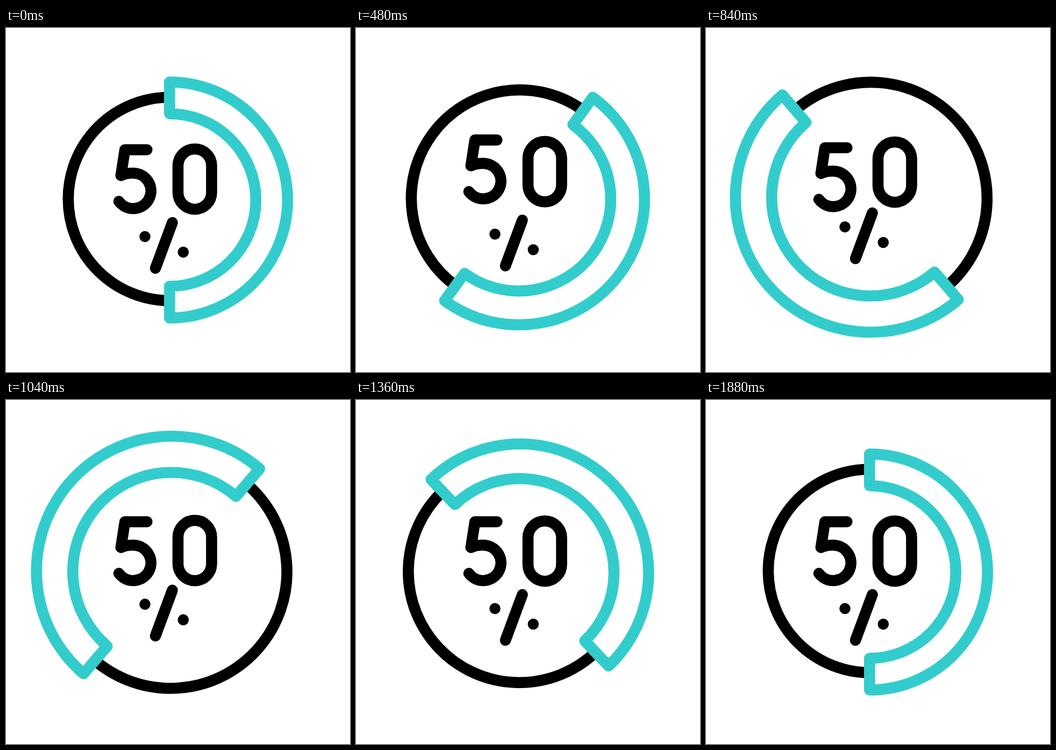
An HTML page for the animation above (2000 ms loop, 640 px wide and 640 px high).

```html
<!DOCTYPE html>
<html lang="en">
<head>
<meta charset="utf-8">
<title>Fifty percent</title>
<style>
  html, body { margin: 0; width: 100%; height: 100%; overflow: hidden; background: #fff; }
  svg { display: block; width: 100%; height: 100%; }
  g { fill: none; stroke: #000; stroke-width: 20.6; stroke-linecap: round; stroke-linejoin: round; }
  .teal { stroke: #33cccc; }
  .half { stroke-linecap: butt; }
  .dot { fill: #000; stroke: none; }
</style>
</head>
<body>
<svg viewBox="0 0 640 640">
  <g id="ring">
    <path class="half" d="M305 128.8A189.2 189.2 0 0 0 305 507.2"/>
    <path class="teal" d="M304.3 100.5A219.5 219.5 0 0 1 304.3 539.5V480.5A160.5 160.5 0 0 0 304.3 159.5Z"/>
  </g>
  <g id="five">
    <path d="M262.3 226.5H221.2L213.8 274.5C220 271.5 228 270 236.5 270A33 33 0 1 1 210 322.5"/>
  </g>
  <g id="zero">
    <rect x="320" y="225" width="62.5" height="112.2" rx="31.25"/>
  </g>
  <g id="percent">
    <path d="M309.5 362L278 447"/>
    <circle class="dot" cx="258.5" cy="388" r="10.3"/>
    <circle class="dot" cx="329.8" cy="417" r="10.3"/>
  </g>
</svg>
<script>
const LOOP = 2000, STEP = 40, LAST = 1880;
const LINE = 20.6, LIFT = 18.3, GROW = 0.147;
const $ = id => document.getElementById(id);
const ring = $('ring');
const glyphs = ['five', 'zero', 'percent'].map($);

// Symmetric cubic-bezier(a, 0, 1 - a, 1), solved by bisection
function ease(u, a) {
  if (u <= 0) return 0;
  if (u >= 1) return 1;
  let lo = 0, hi = 1;
  for (let i = 0; i < 30; i++) {
    const s = (lo + hi) / 2, r = 1 - s;
    const x = 3 * a * s * r * r + 3 * (1 - a) * s * s * r + s * s * s;
    if (x < u) lo = s; else hi = s;
  }
  return lo * lo * (3 - 2 * lo);
}

const ramp = (t, from, to, a = 0.5) => ease((t - from) / (to - from), a);
const swell = (t, from, peak, to) => ramp(t, from, peak) - ramp(t, peak, to);

function draw(t) {
  const angle = 360 * ramp(t, 5, 1875, 0.535);
  const scale = 1 + GROW * swell(t, 50, 955, 1880);
  ring.setAttribute('transform',
    `translate(320 320) scale(${scale}) translate(-13.3 -1.6) rotate(${angle}) translate(-306.7 -318.4)`);
  ring.style.strokeWidth = LINE / scale;

  glyphs.forEach((glyph, i) => {
    const y = -LIFT * swell(t - i * 133, 40, 520, 1000);
    glyph.setAttribute('transform', `translate(0 ${y})`);
  });
}

const start = performance.now();
function tick() {
  const t = (performance.now() - start) % LOOP;
  draw(Math.min(LAST, Math.floor(t / STEP) * STEP));
  requestAnimationFrame(tick);
}
tick();
</script>
</body>
</html>
```
